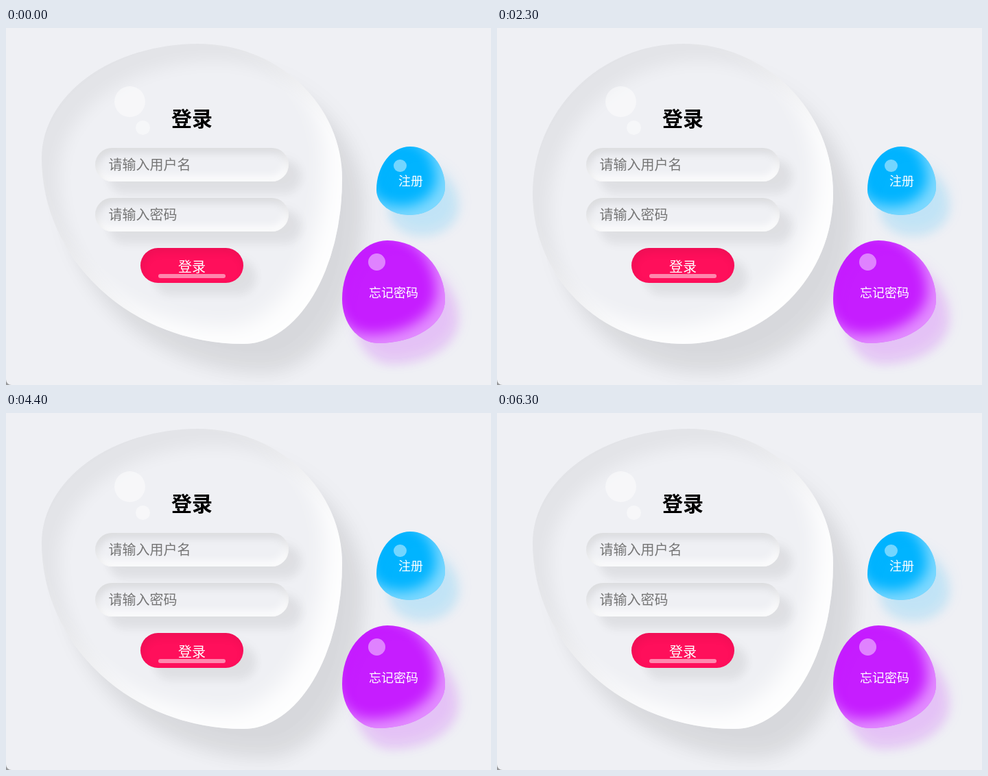
Recreate the animation shown at these times as an HTML page. Size 707 by 521 pixels, loop 7.2 s.

```html
<!DOCTYPE html>
<html lang="zh-CN">
<head>
<meta charset="utf-8">
<title>登录</title>
<style>
  * { box-sizing: border-box; }
  html, body { margin: 0; width: 100%; height: 100%; overflow: hidden; background: #98999b; }
  #stage {
    position: relative; width: 707px; height: 521px; overflow: hidden;
    background: #eff0f4; border-bottom-left-radius: 8px;
  }
  #stage div, svg { position: absolute; }

  #card {
    left: 52.25px; top: 23px; width: 437.5px; height: 437.5px;
    border-radius: 52% 48% 33% 67% / 38% 45% 55% 62%;
    box-shadow:
      inset 25px 25px 25px rgba(0, 0, 0, .05),
      31.25px 43.75px 25px rgba(0, 0, 0, .05),
      31.25px 37.5px 37.5px rgba(0, 0, 0, .05),
      inset -25px -25px 31.25px rgba(255, 255, 255, .9);
  }

  .bubble { border-radius: 50%; background: #fff; opacity: .45; }
  #card .large { left: 106px; top: 62px; width: 45px; height: 45px; }
  #card .small { left: 137px; top: 112px; width: 21px; height: 21px; }

  .field {
    left: 130.4px; width: 281.25px; height: 48.5px; border-radius: 31px;
    box-shadow:
      inset 2.5px 6.25px 12.5px rgba(0, 0, 0, .1),
      inset -2.5px -6.25px 12.5px #fff,
      18.75px 18.75px 12.5px rgba(0, 0, 0, .05),
      18.75px 12.5px 18.75px rgba(0, 0, 0, .025);
  }
  #user { top: 175px; }
  #pass { top: 248px; }

  #submit {
    left: 52px; right: 217px; margin: auto; top: 321px; width: 150px; height: 51px;
    border-radius: 31px; background: #ff0f5b;
    box-shadow:
      inset 2.5px 6.25px 12.5px rgba(0, 0, 0, .07),
      18.75px 18.75px 12.5px rgba(0, 0, 0, .05),
      18.75px 12.5px 18.75px rgba(0, 0, 0, .025);
  }
  #submit div {
    left: 0; right: 0; margin: auto; top: 38px; width: 65%; height: 6px;
    border-radius: 6px; background: rgba(255, 255, 255, .5);
  }

  .drop {
    background: rgb(var(--fill));
    box-shadow:
      inset 12.5px 12.5px 12.5px rgba(var(--glow), .05),
      18.75px 31.25px 12.5px rgba(var(--glow), .1),
      18.75px 25px 25px rgba(var(--glow), .1),
      inset -12.5px -12.5px 18.75px rgba(255, 255, 255, .5);
  }
  #signup {
    --fill: 1, 180, 255; --glow: 1, 180, 255;
    left: 540px; top: 173px; width: 100px; height: 100px;
    border-radius: 49% 51% 52% 48% / 63% 59% 41% 37%;
  }
  #forgot {
    --fill: 198, 29, 255; --glow: 190, 1, 254;
    left: 490px; top: 310px; width: 150px; height: 150px;
    border-radius: 44% 56% 65% 35% / 57% 58% 42% 43%;
  }
  #signup .bubble { left: 25px; top: 18.5px; width: 18.75px; height: 18.75px; }
  #forgot .bubble { left: 37.5px; top: 18.75px; width: 25px; height: 25px; }

  svg { left: 0; top: 0; }
  text { font: 20px "Noto Sans CJK SC", "Noto Sans CJK", sans-serif; fill: #fff; }
  .title { font-size: 30px; font-weight: 700; fill: #000; }
  .hint { fill: #757575; }
  .label { font-size: 18px; }
  .title, .label, .action { text-anchor: middle; }
</style>
</head>
<body>
<div id="stage">
  <div id="card">
    <div class="bubble large"></div>
    <div class="bubble small"></div>
  </div>
  <div class="field" id="user"></div>
  <div class="field" id="pass"></div>
  <div id="submit"><div></div></div>
  <div class="drop" id="signup"><div class="bubble"></div></div>
  <div class="drop" id="forgot"><div class="bubble"></div></div>
  <svg width="707" height="521">
    <text class="title" x="271" y="143.4">登录</text>
    <text class="hint" x="149.5" y="206.8">请输入用户名</text>
    <text class="hint" x="149.5" y="279.8">请输入密码</text>
    <text class="action" x="271" y="355.6">登录</text>
    <text class="label" x="590" y="230">注册</text>
    <text class="label" x="565" y="392.6">忘记密码</text>
  </svg>
</div>
<script>
  const LOOP = 7200;
  const STEP = 100; // the picture advances ten times a second

  // Ease a property to its hover value at `enter` and back at `leave`.
  function hover(id, prop, value, enter, leave, duration) {
    const el = document.getElementById(id);
    const rest = getComputedStyle(el)[prop];
    const key = (v, ms) => ({ [prop]: v, offset: ms / LOOP, easing: 'ease' });
    const animation = el.animate([
      key(rest, 0),
      key(rest, enter), key(value, enter + duration),
      key(value, leave), key(rest, leave + duration),
      key(rest, LOOP)
    ], { duration: LOOP, iterations: Infinity });
    animation.pause();
    return animation;
  }

  const animations = [
    hover('card', 'borderRadius', '50%', 300, 2600, 400),
    hover('submit', 'width', '187.5px', 1000, 1800, 500),
    hover('signup', 'borderRadius', '50%', 3300, 4200, 300),
    hover('forgot', 'borderRadius', '50%', 5000, 6000, 300)
  ];

  const start = performance.now();
  function draw() {
    const elapsed = (performance.now() - start) % LOOP;
    const time = Math.floor(elapsed / STEP) * STEP;
    for (const animation of animations) animation.currentTime = time;
    requestAnimationFrame(draw);
  }
  draw();
</script>
</body>
</html>
```
